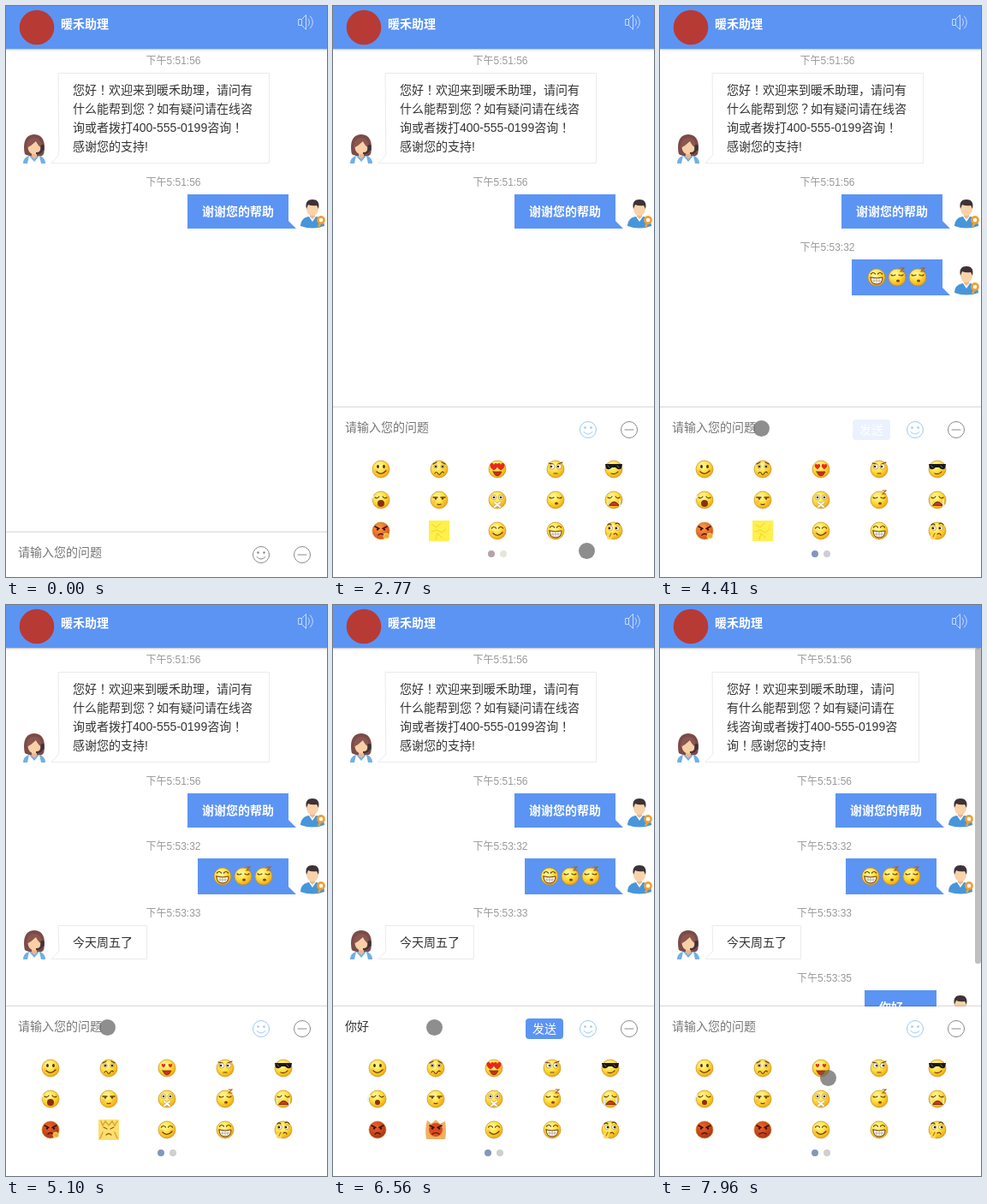
An HTML page for the animation above (8 s loop, 375 by 667 pixels).

```html
<!DOCTYPE html>
<html lang="zh-CN">
<head>
<meta charset="utf-8">
<title>在线客服</title>
<style>
html, body { margin: 0; width: 100%; height: 100%; overflow: hidden; background: #fff; }
svg { display: block; width: 100%; height: 100%; }
text { font: 14px "Liberation Sans", "Noto Sans CJK SC", "Noto Sans CJK", sans-serif; white-space: pre; }
.b { font-weight: bold; }
.mark { font-family: "Noto Sans CJK TC", "Noto Sans CJK", sans-serif; }
.time { font-size: 12px; text-anchor: middle; }
.ime { font: 16px "Noto Sans Mono CJK SC", "Noto Sans CJK SC", "Noto Sans CJK", monospace; }
</style>
</head>
<body>
<svg viewBox="0 0 375 667">
  <defs>
    <radialGradient id="gold" cx=".4" cy=".32" r=".7">
      <stop offset="0" stop-color="#fffbb0"/><stop offset=".5" stop-color="#ffe03c"/><stop offset="1" stop-color="#eea610"/>
    </radialGradient>
    <radialGradient id="hot" cx=".4" cy=".32" r=".7">
      <stop offset="0" stop-color="#ffa04a"/><stop offset="1" stop-color="#d8481c"/>
    </radialGradient>
    <radialGradient id="hotter" cx=".4" cy=".32" r=".7">
      <stop offset="0" stop-color="#f0662c"/><stop offset="1" stop-color="#a8301a"/>
    </radialGradient>
    <g id="agent">
      <path d="M-11 6C-13-2-13-17 0-17S13-2 11 6Q8 10 0 9T-11 6Z" fill="#7b4b48"/>
      <path d="M-13 17Q-13 10-6 8H6Q13 10 13 17Z" fill="#6fb0e6"/>
      <path d="M-6 8L0 15 6 8 8 17H-8Z" fill="#fff"/>
      <path d="M-3 4H3V9L0 12-3 9Z" fill="#eeb48c"/>
      <ellipse cy="-2" rx="7.5" ry="8.5" fill="#f8cfa6"/>
      <path d="M-9-1Q-9-13 0-13T9-1Q4-4 2-9-3-4-9-1Z" fill="#8a5650"/>
      <path d="M9 0Q9 5 2 5" fill="none" stroke="#3c3438" stroke-width="2"/>
      <rect x="7.5" y="-5" width="4" height="7" rx="1.5" fill="#3c3438"/>
    </g>
    <g id="guest">
      <path d="M-14 14Q-14 5-5 3H5Q14 5 14 14Q0 19-14 14Z" fill="#4796da"/>
      <path d="M-4 3L0 9 4 3Z" fill="#fff"/>
      <path d="M-3-1H3V3L0 6-3 3Z" fill="#eab98c"/>
      <ellipse cy="-6" rx="7" ry="8" fill="#f9d2aa"/>
      <path d="M-7-6C-9-14-5-17 0-17S9-14 7-6L5-10Q-1-9-5-11Z" fill="#3d3236"/>
      <circle cx="10" cy="7" r="3.600" fill="#fff" stroke="#f0a030" stroke-width="2.600"/>
      <path d="M9 11L7 15" stroke="#f0a030" stroke-width="2.600"/>
    </g>
  </defs>
  <g id="stage"></g>
</svg>
<script>
const LOOP = 8000, BLUE = '#5c94f4', INK = '#6a3c08';
const stage = document.getElementById('stage');

// Bursts of screen updates: start, end, steps
const bursts = [
  [510, 820, 5], [1370, 1830, 7], [2060, 2140, 2], [2460, 2460, 1], [2690, 3460, 11], [3560, 4340, 11],
  [4410, 5170, 11], [5250, 6020, 11], [6100, 6860, 11], [6940, 7730, 11], [7800, 7960, 3]
];
// Pointer path: time, x, y
const route = [
  [510, 290, 664], [820, 180, 372], [1300, 180, 372], [1450, 200, 327], [1677, 268, 413], [1753, 298, 630],
  [2060, 301, 646], [2140, 296, 636], [2790, 296, 636], [2920, 256, 613], [3150, 256, 613], [3300, 256, 577],
  [3650, 256, 577], [3870, 247, 495], [4110, 247, 495], [4330, 118, 493], [6900, 118, 493],
  [7170, 247, 495], [7330, 247, 495], [7640, 196, 552]
];
const at = {
  open: 2690, settle: 2840, sent: 4110, reply: 4720, focus: 4480,
  keys: [5320, 5400, 5550, 5710, 5780], commit: 5940, sent2: 7240
};
const presses = [2460, 2990, 3370, 3590, 4020, 7230];

const path = (d, stroke = INK, w = 1.2, fill = 'none') =>
  `<path d="${d}" fill="${fill}" stroke="${stroke}" stroke-width="${w}" stroke-linecap="round"/>`;
const fill = (d, c) => `<path d="${d}" fill="${c}"/>`;
const dot = (x, y, r, c) => `<circle cx="${x}" cy="${y}" r="${r}" fill="${c}"/>`;
const oval = (x, y, rx, ry, c) => `<ellipse cx="${x}" cy="${y}" rx="${rx}" ry="${ry}" fill="${c}"/>`;
const rect = (x, y, w, h, c, more = '') => `<rect x="${x}" y="${y}" width="${w}" height="${h}" fill="${c}" ${more}/>`;
const text = (x, y, s, c = '#333', cls = '') =>
  `<text x="${x}" y="${y}" fill="${c}" class="${cls}">${s.replace(/[！？]/g, '<tspan class="mark" lang="zh-TW">$&</tspan>')}</text>`;
const put = (x, y, s, more = '') => `<g transform="translate(${x} ${y}) ${more}">${s}</g>`;
const clamp = v => Math.max(0, Math.min(1, v));

function snap(t) {
  let q = 0;
  for (const [a, b, n] of bursts) {
    if (t + 8 < a) break;
    const step = n > 1 ? (b - a) / (n - 1) : 0;
    q = a + (step ? Math.min(n - 1, Math.floor((t + 8 - a) / step)) * step : 0);
  }
  return q;
}

function pointerAt(t) {
  const i = route.findIndex(p => p[0] > t);
  if (i < 0) return route[route.length - 1].slice(1);
  const a = route[Math.max(0, i - 1)], b = route[i];
  const k = clamp((t - a[0]) / (b[0] - a[0]));
  return [a[1] + (b[1] - a[1]) * k, a[2] + (b[2] - a[2]) * k];
}

// Emoticons, each about 20 px wide around its centre
const ball = (skin = 'gold') => `<circle r="10" fill="url(#${skin})" stroke="#c98c18" stroke-width=".7"/>`;
const openEyes = (dx = 0, r = 3) => [-4, 4].map(x =>
  dot(x, -3, r, '#fff') + `<circle cx="${x}" cy="-3" r="${r}" fill="none" stroke="#a8741a" stroke-width=".6"/>` + dot(x + dx, -3, 1.3, '#3a2000')).join('');
const darkEyes = [-3.5, 3.5].map(x => oval(x, -3, 1.4, 2.1, '#4a2804')).join('');
const shutEyes = (dy = -3) => [-4, 4].map(x => path(`M${x - 2.5} ${dy}q2.5-3 5 0`)).join('');
const sadEyes = path('M-7-3q3 2 5-1M7-3q-3 2-5-1');
const smile = path('M-5 3Q0 8 6 2');
const blush = dot(-6, 2, 2.2, '#ff9a5066') + dot(6, 2, 2.2, '#ff9a5066');
const heart = 'M0 4C-6 0-4-4-1.5-3.5Q0-3 0-1.5 0-3 1.5-3.5C4-4 6 0 0 4Z';
const glare = path('M-7-5L-2-2.5M7-5L2-2.5', '#401000', 1.6) + dot(-4, -1.5, 1.2, '#401000') + dot(4, -1.5, 1.2, '#401000');

function fury(t) {
  const frown = path('M-4 5Q0 2 4 5', '#401000');
  if (t < 4800) return rect(-12, -12, 24, 24, '#fff04c') + path('M-8-7l5 3 5-5M-9 1l6-2 6 3 5-4M-4 10l2-7 5 5', '#f2d428', 1);
  if (t < 6000) return rect(-12, -12, 24, 24, '#fbe070') + path('M-9-10l2 5 3-5 4 5 4-5 3 5 3-5M-10 10l3-7M10 10l-3-7', '#e0a028', 1.4) +
    path('M-6-3l4 2M6-3l-4 2M-3 6q3-3 6 0', '#9a5c10');
  if (t < 7000) return fill('M-11 11Q-13-2-10-11L-5-7 0-12 5-7 11-10Q13 2 11 11Z', '#f0b060') + oval(0, 0, 8, 8, '#dc4a20') + glare + frown;
  return ball('hotter') + glare + frown;
}

function face(i, t) {
  const beat = Math.floor(t / 310) % 2, p = beat ? 1 : -1;
  const size = 0.85 + 0.3 * Math.cos((t - 6560) / 950 * 2 * Math.PI);
  switch (i) {
    case 0: return ball() + blush + darkEyes + smile;
    case 1: return ball() + path('M-7-6l4-2M7-6l-4-2') + openEyes(0, 2.2) + path('M-5 5q1.7-3 3.4 0t3.4 0 3.4-1');
    case 2: return ball() + [-4, 4].map(x => put(x, -3, fill(heart, '#e8281c'), `scale(${size})`)).join('') +
      path('M-5 3H5Q3 8 0 8T-5 3Z', '#8a2a10', .8, '#c83018');
    case 3: return ball() + path('M-8-7l5 1M8-8l-5 2') + openEyes(p) + path('M-2 5h4');
    case 4: return ball() + fill('M-10-6H10L9-1Q6 2 2-2H-2Q-6 2-9-1Z', '#181818') + path('M-7-4l2 2M4-4l2 2', '#888', .8) + path('M-3 5Q2 7 5 3');
    case 5: return ball() + sadEyes + oval(0, 4, beat ? 3 : 4, beat ? 3 : 4, '#8a3010') + path('M-9-4q-4 4-1 8', '#e8f4ff', 1.8);
    case 6: return ball() + blush + path('M-7-3h5M2-3h5', INK, 1.6) + dot(-4, -1.5, 1.2, INK) + dot(4, -1.5, 1.2, INK) + path('M-2 5q2 1 4 0');
    case 7: return ball() + openEyes(0, 2.8) + path('M-3 3l6 5M3 3l-6 5', '#c8a060', 3) + path('M-3 3l6 5M3 3l-6 5', '#fff', 2);
    case 8: {
      const high = Math.floor(t / 600) % 3 === 0;
      const snore = t < 2900 ? '' : high ? path('M8-6V-11l2-1', '#b06010', 1) : path('M4-11h4l-4 4h4', '#b06010', 1.1);
      return ball() + path('M-7-3q2 2 5 0M2-3q3 2 5 0') + oval(1, 4, 2, 1.5, '#8a4010') + snore;
    }
    case 9: return ball() + sadEyes + path('M-5 6Q0-2 6 6Z', '#7a2010', 1, '#c04020') + path(`M-7 0v${beat ? 7 : 5}M7 0v${beat ? 5 : 7}`, '#d8ecff', 1.8);
    case 10: return ball(t > 5000 ? 'hotter' : 'hot') + glare + path('M-3 5q3-3 6 0', '#401000') +
      (t > 6000 ? '' : dot(6, 6, 3.5, '#ffd24a') + path('M4 5h5M4 7h5', '#b87818', .7));
    case 11: return fury(t);
    case 12: return Math.floor(t / 500) % 5 === 1
      ? ball() + path('M-7-3l4 1M2-3q2-3 5 0') + path('M-5 2Q0 5 6 1') + fill('M-1 4H5Q5 9 2 9T-1 4Z', '#e8483a')
      : ball() + blush + shutEyes() + smile;
    case 13: return ball() + shutEyes(-4) + path('M-7 0Q0 2 7 0 7 8 0 8T-7 0Z', INK, 1, '#fff') + path('M-6 4H6M-3 1v6M0 1v7M3 1v6', '#a08060', .6);
    default: return ball() + path('M-7-7q2-2 4 0M2-8q3-2 5 1') + openEyes(p, 2.5) + path('M0 4q3-2 4 1') + dot(-5, 7, 3.2, '#ffd860') + path('M-5 7l2-4', '#b87818', 1.2);
  }
}

const stamp = (x, y, s) => text(x, y, '下午' + s, '#999', 'time');

function botBubble(y, w, h, lines) {
  const b = y + h - .5, r = 61 + w - .5;
  return `<use href="#agent" x="33" y="${y + h - 17}"/>` +
    path(`M61.5 ${y + .5}H${r}V${b}H53L61.5 ${b - 9}Z`, '#ebebeb', 1, '#fff') +
    lines.map((s, i) => text(78, y + 25 + i * 22, s)).join('');
}

function userBubble(y, w, h, dx, inner) {
  const r = 330 + dx, b = y + h;
  return `<use href="#guest" x="${358 + dx}" y="${b - 17}"/>` +
    fill(`M${r - w} ${y}H${r}V${b - 9}L${r + 9} ${b}H${r - w}Z`, BLUE) + put(r - w + 17, y, inner);
}

function chat(t) {
  const bar = t >= at.sent2, dx = bar ? -7 : 0, mid = bar ? 192 : 195.5;
  const hello = bar
    ? ['您好！欢迎来到暖禾助理，请问', '有什么能帮到您？如有疑问请在', '线咨询或者拨打400-555-0199咨', '询！感谢您的支持!']
    : ['您好！欢迎来到暖禾助理，请问有', '什么能帮到您？如有疑问请在线咨', '询或者拨打400-555-0199咨询！', '感谢您的支持!'];
  let s = stamp(mid, 67.5, '5:51:56') + botBubble(78, bar ? 242 : 247, 106, hello) +
    stamp(mid, 209.5, '5:51:56') + userBubble(220, 118, 40, dx, text(0, 25, '谢谢您的帮助', '#fff', 'b'));
  if (t >= at.sent) s += stamp(mid, 285.5, '5:53:32') +
    userBubble(296, 106, 42, dx, [13, 8, 8].map((f, i) => put(12 + 24 * i, 21, face(f, t))).join(''));
  if (t >= at.reply) s += stamp(mid, 363.5, '5:53:33') + botBubble(374, 104, 40, ['今天周五了']);
  if (bar) s += stamp(mid, 439.5, '5:53:35') + userBubble(450, 84, 40, dx, text(0, 25, '你好', '#fff', 'b')) +
    rect(368, 50, 7, 369, '#c0c0c0', 'rx="3"');
  return s;
}

const header = rect(0, 50, 375, 1, '#0003') + rect(0, 51, 375, 1.5, '#0001') + rect(0, 0, 375, 50, BLUE) +
  dot(36, 25, 20.3, '#b83a34') + text(64, 26, '暖禾助理', '#fff', 'b') +
  path('M342 15.5h3.5l5-5v17l-5-5H342ZM345.500 15.500v7M353 15q3 4 0 8M355.500 12q6 7 0 14', '#c9dcfc', 1);

function draft(t) {
  if (t < at.sent) {
    const n = [3000, 3380, 3600].filter(v => v <= t).length;
    return ['[呲牙]', '[困]', '[困]'].slice(0, n).join('');
  }
  if (t >= at.commit && t < at.sent2) return '你好';
  return t < at.commit ? 'nihao'.slice(0, at.keys.filter(k => k <= t).length) : '';
}

function sendOpacity(t) {
  if (t < at.sent) return clamp((t - 2990) / 300);
  if (t < at.commit) return clamp(1 - (t - at.sent) / 340);
  return t < at.sent2 ? clamp((t - at.commit) / 300) : clamp(1 - (t - at.sent2) / 340);
}

function ime(keys) {
  const shown = keys.length > 2 ? "ni'" + keys.slice(2) : keys;
  const words = keys.length > 2
    ? [[25, '你好'], [86, '你还'], [147, '你会'], [208, '(*ˊ▽ ˋ)ノノ'], [333, 'NIH']]
    : [[25, '你'], [70, '呢'], [115, '年'], [160, '能'], [205, '那']];
  return rect(14.5, 500.5, 370, 55, '#fff', 'stroke="#a3bdd0"') +
    `<text x="24.5" y="520" fill="#1a70c4" class="b" style="font-size:16px">${shown}<tspan dx="-.5" fill="#333" font-weight="400">|</tspan></text>` +
    path('M19 527.5H375', '#e4edf4', 1) +
    words.map(([x, w], i) => text(x, 547, `${i + 1}.${w}`, i ? '#1583d6' : '#e8201c', 'ime')).join('');
}

function composer(t) {
  const open = t >= at.open, top = open ? 468 : 614, mid = top + 27;
  const value = draft(t), composing = t >= at.keys[0] && t < at.commit;
  const mood = open ? '#9cc9f0' : '#8a8a8a', dx = t < at.settle ? 4 : 0;
  let s = rect(0, top - 1, 375, 1, '#0000000c') + rect(0, top, 375, 1.5, '#00000020') + rect(0, top + 1, 375, 667 - top, '#fff');
  s += text(14, mid + 2, value || '请输入您的问题', value ? '#333' : '#777');
  const width = composing ? [0, 8, 11, 19, 27, 35][value.length] : value.length * 14;
  const since = t < at.keys[0] ? t - at.focus : t - at.commit;
  if (composing || (t >= at.focus && t < at.sent2 && Math.floor(since / 530) % 2 === 0))
    s += rect(14 + width, mid - 10, 1, 15, '#222');
  if (composing) s += path(`M14 499h${width}`, '#d83a30', 1);
  const o = sendOpacity(t);
  if (o) s += `<g opacity="${o}">${rect(225, 483, 44, 24, BLUE, 'rx="4"')}${text(233, 500, '发送', '#fff')}</g>`;
  s += put(298, mid, `<circle r="9.5" fill="none" stroke="${mood}"/>` + dot(-3.5, -2.5, 1.3, mood) + dot(3.5, -2.5, 1.3, mood) + path('M-5 2.5Q0 8 5 2.5', mood, 1));
  s += put(346, mid, `<circle r="9.5" fill="none" stroke="#8a8a8a"/>` + path('M-5 0H5', '#8a8a8a', 1));
  if (open) {
    for (let i = 0; i < 15; i++) s += put(52 + dx + 68 * (i % 5), 541 + 36 * Math.floor(i / 5), face(i, t));
    s += dot(181 + dx, 640, 4, dx ? '#b5a3ab' : '#8496bb') + dot(195 + dx, 640, 4, dx ? '#e6e6d4' : '#cfcfcf');
  }
  return s + (composing ? ime(value) : '');
}

function pointer(t) {
  if (t < 510 || (t > 1825 && t < 2060)) return '';
  const [x, y] = pointerAt(t), down = presses.some(p => t >= p && t < p + 80);
  return `<circle cx="${x + .5}" cy="${y + .5}" r="9.5" fill="#606060" fill-opacity="${down ? .82 : .71}"/>`;
}

let last = -1;
function frame(now) {
  const t = snap(now % LOOP);
  if (t !== last) {
    last = t;
    stage.innerHTML = rect(0, 0, 375, 667, '#fff') + chat(t) + header + composer(t) + pointer(t);
  }
  requestAnimationFrame(frame);
}
frame(0);
</script>
</body>
</html>
```
